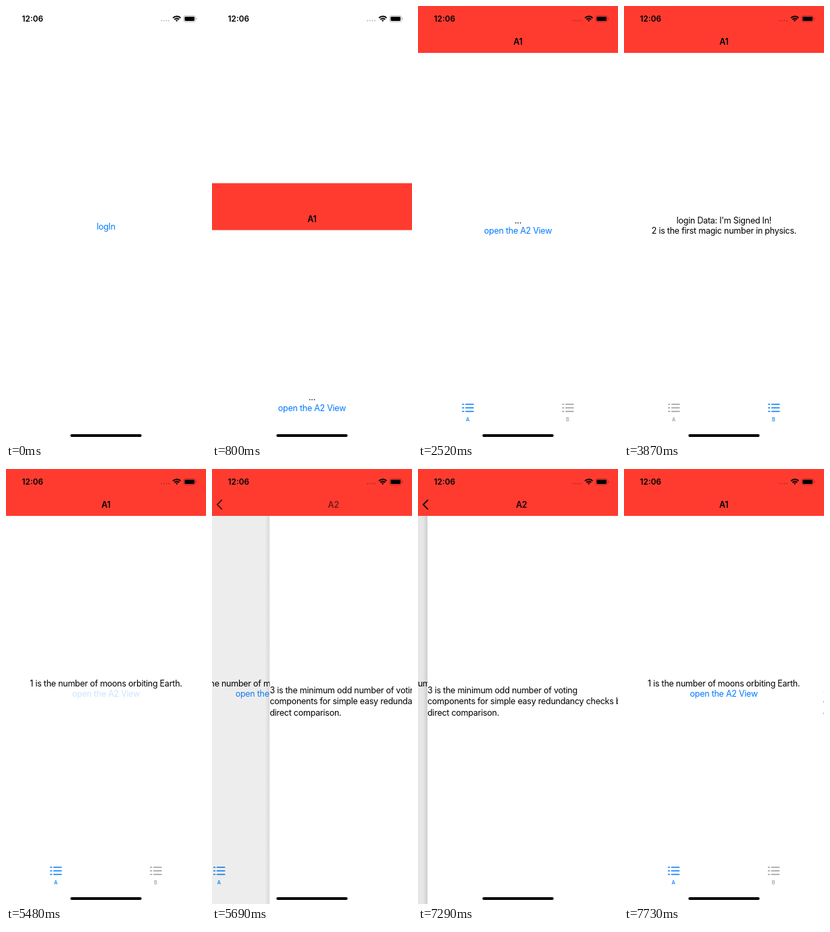
An HTML page that plays this animation: 296 px wide and 640 px high, repeating every 8000 ms.

```html
<!DOCTYPE html>
<html lang="en">
<head>
<meta charset="utf-8">
<title>Tab and navigation demo</title>
<style>
html, body { margin: 0; width: 100%; height: 100%; overflow: hidden; background: #fff; }
svg { display: block; }
text { font: 400 12.5px Inter, Roboto, sans-serif; letter-spacing: -.02em; }
.mid { text-anchor: middle; }
.link { fill: #007aff; }
.title { font-weight: 600; }
.clock { font-size: 11.8px; font-weight: 600; letter-spacing: 0; }
.tab text { font-size: 7.4px; font-weight: 500; letter-spacing: 0; }
.tab path { fill: none; stroke-width: 1.5; stroke-linecap: round; }
</style>
</head>
<body>
<svg width="296" height="640" viewBox="0 0 296 640">
  <defs>
    <linearGradient id="shade"><stop stop-opacity="0"/><stop offset="1" stop-opacity=".12"/></linearGradient>
  </defs>
  <rect width="296" height="640" fill="#fff"/>
  <text id="login" class="mid link" x="148" y="329.3">logIn</text>

  <g id="app">
    <rect width="296" height="640" fill="#fff"/>
    <g id="root">
      <rect width="296" height="640" fill="#fff"/>
      <text id="line1" class="mid" x="148" y="319.6"></text>
      <text id="line2" class="mid" x="148" y="335.4"></text>
      <g class="tab" id="tabA" transform="translate(74)"><text class="mid" x="-.5" y="611.3">A</text></g>
      <g class="tab" id="tabB" transform="translate(222)"><text class="mid" x="-.5" y="611.3">B</text></g>
      <rect id="dim" width="296" height="640"/>
    </g>
    <g id="detail">
      <rect id="edge" x="-7" width="7" height="640" fill="url(#shade)"/>
      <rect width="296" height="640" fill="#fff"/>
      <text x="0" y="329.7">3 is the minimum odd number of voting</text>
      <text x="0" y="346.3">components for simple easy redundancy checks by</text>
      <text x="0" y="362.9">direct comparison.</text>
    </g>
    <rect width="296" height="69" fill="#ff3b30"/>
    <text id="title1" class="mid title" x="148" y="57">A1</text>
    <text id="title2" class="mid title" x="148" y="57">A2</text>
    <path id="back" d="M14.3 45.8 7.8 52.3 14.3 58.8" fill="none" stroke="#000" stroke-width="1.9" stroke-linecap="round" stroke-linejoin="round"/>
  </g>

  <text class="clock" x="23.6" y="23.2">12:06</text>
  <path d="M230.2 21.6h11" stroke="#000" stroke-opacity=".28" stroke-width="2" stroke-linecap="round" stroke-dasharray="0 3.6"/>
  <g fill="none" stroke="#000" stroke-width="1.9">
    <path d="M247 17.6a8 8 0 0 1 11.4 0M249.2 19.9a4.9 4.9 0 0 1 7 0"/>
    <path d="M250.9 21.3a2.6 2.6 0 0 1 3.6 0L252.7 23.1Z" fill="#000" stroke="none"/>
  </g>
  <rect x="263" y="14.3" width="17.4" height="9" rx="2.6" fill="none" stroke="#000" stroke-opacity=".35" stroke-width=".8"/>
  <rect x="264.4" y="15.7" width="14.6" height="6.2" rx="1.4"/>
  <path d="M281.4 17.3a1.6 1.6 0 0 1 0 3Z" fill-opacity=".4"/>
  <rect x="95.3" y="630" width="105.4" height="4" rx="2"/>
</svg>
<script>
const LOOP = 8000, W = 296, H = 640;
const beats = [0, 500, 800, 920, 1040, 1150, 2520, 2830, 3980, 4180,
  5480, 5580, 5685, 5790, 5895, 6000, 7180, 7290, 7400, 7510, 7620, 7730];
const $ = id => document.getElementById(id);
const set = (id, attrs) => {
  for (const k in attrs) $(id).setAttribute(k, attrs[k]);
};
const shift = (id, x, y = 0) => set(id, { transform: `translate(${x} ${y})` });

// Remaining distance (1 to 0) of a critically damped spring released at `start`
const rest = (t, start) => {
  const x = Math.max(0, t - start) * .0172;
  return (1 + x) * Math.exp(-x);
};

for (const id of ['tabA', 'tabB']) {
  const rows = [586, 591.2, 596.4].map(y => `M-8.2 ${y}h1.9M-3.4 ${y}h11.4`).join('');
  $(id).insertAdjacentHTML('afterbegin', `<path d="${rows}"/>`);
}

function draw(now) {
  const time = now % LOOP;
  const t = beats.filter(b => b <= time).pop();
  const onB = t >= 2830 && t < 3980;
  const fact = t >= 4180 ? '1 is the number of moons orbiting Earth.' : '...';
  const push = t < 7180 ? 1 - rest(t, 5540) : rest(t, 7270);

  set('login', { opacity: t < 500 ? 1 : .2 });
  shift('app', 0, t < 800 ? H : t < 2520 ? H * rest(t, 684) : 0);

  $('line1').textContent = onB ? "login Data: I'm Signed In!" : fact;
  $('line2').textContent = onB ? '2 is the first magic number in physics.' : 'open the A2 View';
  const pressed = t >= 5480 && t < 7180;
  set('line2', { class: onB ? 'mid' : 'mid link', opacity: pressed ? Math.min(1, .2 + push) : 1 });
  const tint = (id, on) => set(id, { fill: on ? '#007aff' : '#999', stroke: 'none' });
  for (const [id, on] of [['tabA', !onB], ['tabB', onB]]) {
    tint(id, on);
    $(id).firstChild.setAttribute('stroke', on ? '#007aff' : '#999');
  }

  shift('root', -.3 * W * push);
  set('dim', { opacity: .1 * push });
  shift('detail', W * (1 - push));
  set('edge', { opacity: push });
  shift('title1', -110 * push);
  set('title1', { opacity: Math.max(0, 1 - 1.6 * push) });
  shift('title2', 110 * (1 - push));
  set('title2', { opacity: Math.max(0, 1.6 * push - .6) });
  set('back', { opacity: t === 7180 ? .3 : push < .01 ? 0 : push });
}

const begin = performance.now();
function tick() {
  draw(performance.now() - begin);
  requestAnimationFrame(tick);
}
tick();
</script>
</body>
</html>
```
